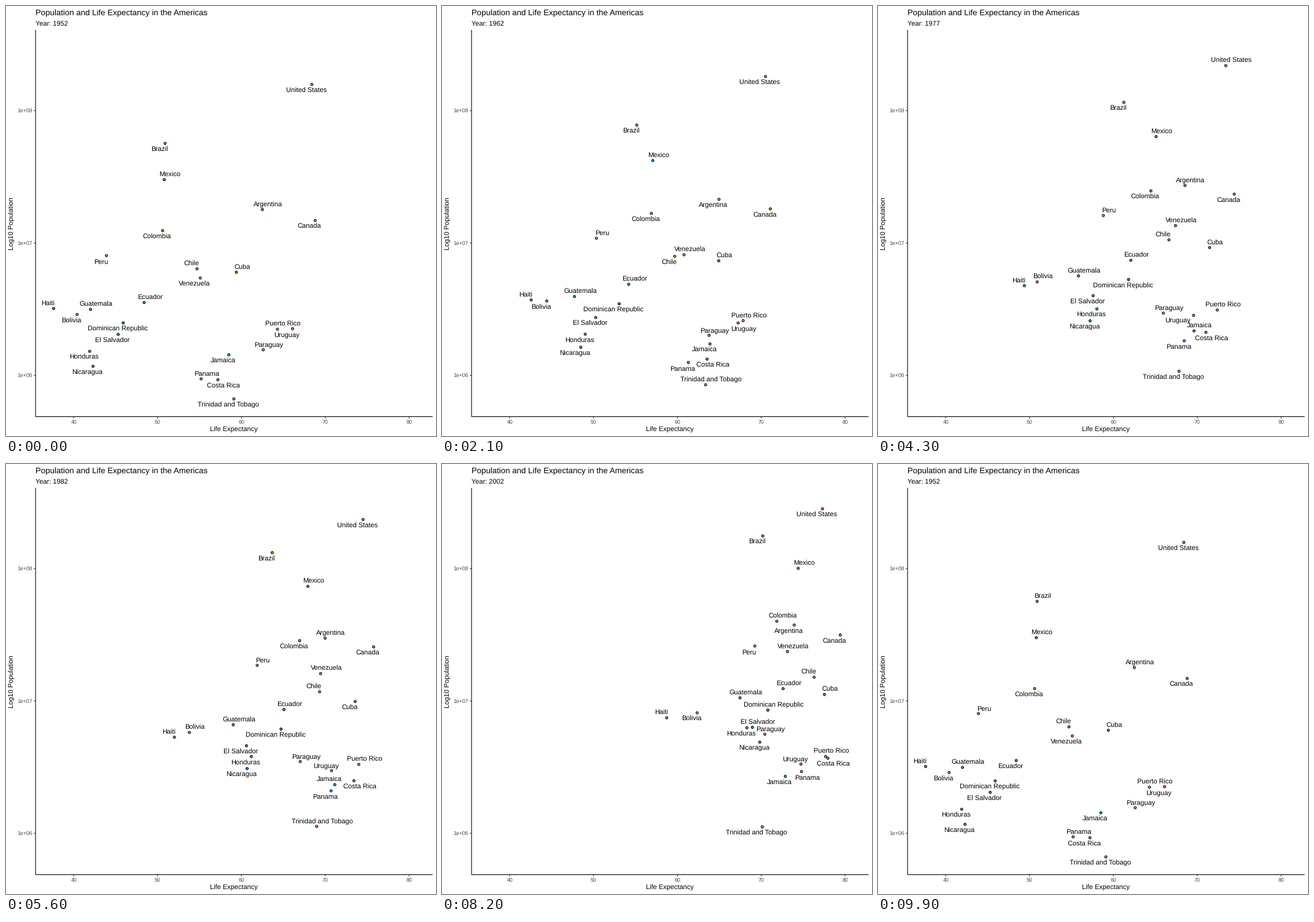
A matplotlib script for the animation above (10 s loop, 700 by 700 pixels).

```python
import random

import matplotlib.pyplot as plt
import numpy as np
from matplotlib.animation import FuncAnimation

plt.rcParams.update({"font.family": "Liberation Sans", "text.hinting": "none"})

SIZE = 700
LEFT, RIGHT, TOP, BOTTOM = 48.1, 694.5, 38.9, 668.5
STATES = 12
KEYS = [0, 6, 11]  # 1952, 1982 and 2007

# Life expectancy and population in millions at the keys, favoured label side
COUNTRIES = {
    "Argentina": ((62.5, 69.7, 75.3), (17.9, 29.3, 40.3), "NE"),
    "Bolivia": ((40.4, 53.2, 65.6), (2.88, 5.64, 9.12), "SW"),
    "Brazil": ((50.9, 63.2, 72.4), (56.6, 129, 190), "SW"),
    "Canada": ((68.8, 75.5, 80.7), (14.8, 25.2, 33.4), "SW"),
    "Chile": ((54.7, 68.8, 78.6), (6.38, 11.5, 16.3), "NW"),
    "Colombia": ((50.6, 66.5, 72.9), (12.4, 27.8, 44.2), "SW"),
    "Costa Rica": ((57.2, 73, 78.8), (.926, 2.42, 4.13), "SE"),
    "Cuba": ((59.4, 73.2, 78.3), (6.01, 9.79, 11.4), "NE"),
    "Dominican Republic": ((45.9, 64.2, 72.2), (2.49, 5.97, 9.32), "SW"),
    "Ecuador": ((48.4, 64.5, 75), (3.55, 8.37, 13.8), "NE"),
    "El Salvador": ((45.3, 60, 71.9), (2.04, 4.47, 6.94), "SW"),
    "Guatemala": ((42, 58.4, 70.3), (3.15, 6.4, 12.6), "NE"),
    "Haiti": ((37.6, 51.5, 60.9), (3.2, 5.2, 8.5), "NW"),
    "Honduras": ((41.9, 60.6, 70.2), (1.52, 3.67, 7.48), "SW"),
    "Jamaica": ((58.5, 70.9, 72.6), (1.43, 2.3, 2.78), "SW"),
    "Mexico": ((50.8, 67.4, 76.2), (30.1, 71.6, 109), "NE"),
    "Nicaragua": ((42.3, 60, 72.9), (1.17, 2.98, 5.68), "SW"),
    "Panama": ((55.2, 70.3, 75.5), (.94, 2.04, 3.24), "SW"),
    "Paraguay": ((62.6, 66.8, 71.8), (1.56, 3.37, 6.67), "NE"),
    "Peru": ((43.9, 61.3, 71.4), (8.03, 18.1, 28.7), "SW"),
    "Puerto Rico": ((64.3, 73.7, 78.7), (2.23, 3.28, 3.94), "NE"),
    "Trinidad and Tobago": ((59.1, 68.8, 69.8), (.663, 1.12, 1.06), "SW"),
    "United States": ((68.4, 74.3, 78.2), (158, 232, 301), "SW"),
    "Uruguay": ((66.1, 70.5, 76.4), (2.25, 2.95, 3.45), "NW"),
    "Venezuela": ((55.1, 69.1, 73.7), (5.44, 15.6, 26.1), "NE"),
}

# Timeline in state units: a hold, then a four-step linear move
timeline = []
for k in range(STATES):
    timeline += [k] * (5 if k < 4 else 4) + [k + q / 4 for q in (1, 2, 3, 4)]


def px(life):
    return 110.3 + (life - 40) * 13.645


def py(log_pop):
    return 601.2 - (log_pop - 6) * 215.4


def closed_path(values):
    """Parabola through the keys, sampled per state and closed to a loop."""
    path = np.polyval(np.polyfit(KEYS, values, 2), np.arange(STATES))
    return np.append(path, path[0])


def hue(h, c=100, l=65):
    """Polar LUV colour to sRGB."""
    u, v = c * np.cos(np.radians(h)), c * np.sin(np.radians(h))
    y = ((l + 16) / 116) ** 3
    u, v = u / (13 * l) + 0.1978398, v / (13 * l) + 0.4683363
    x = 9 * y * u / (4 * v)
    z = -x / 3 - 5 * y + 3 * y / v
    rgb = np.array([[3.240479, -1.53715, -0.498535],
                    [-0.969256, 1.875992, 0.041556],
                    [0.055648, -0.204043, 1.057311]]) @ [x, y, z]
    rgb = np.where(rgb > 0.00304, 1.055 * np.abs(rgb) ** (1 / 2.4) - 0.055, 12.92 * rgb)
    return tuple(np.clip(rgb, 0, 1))


fig = plt.figure(figsize=(SIZE / 72, SIZE / 72), dpi=72, facecolor="white")
ax = fig.add_axes([0, 0, 1, 1])
ax.set(xlim=(0, SIZE), ylim=(SIZE, 0))
ax.axis("off")


def write(x, y, s, size=11, **kw):
    return ax.text(x, y, s, fontsize=size, **{"va": "baseline", "color": "black", **kw})


def line(xs, ys, color="black"):
    ax.plot(xs, ys, color=color, lw=1.07, solid_capstyle="butt", snap=False)


write(48, 15, "Population and Life Expectancy in the Americas", 13.2)
subtitle = write(48, 32, "")
write(371.3, 693, "Life Expectancy", ha="center")
write(10.3, 354, "Log10 Population", rotation=90, ha="center", va="center")
for life in range(40, 90, 10):
    line([px(life)] * 2, [BOTTOM, BOTTOM + 2.8], "#333333")
    write(px(life), 680.3, str(life), 8.8, ha="center", color="#4d4d4d")
for p in (6, 7, 8):
    line([LEFT - 2.8, LEFT], [py(p)] * 2, "#333333")
    write(43.2, py(p) + 3, f"1e+0{p}", 8.8, ha="right", color="#4d4d4d")
line([LEFT, LEFT], [TOP, BOTTOM])
line([LEFT, RIGHT], [BOTTOM, BOTTOM])

count = len(COUNTRIES)
dots = ax.scatter([0] * count, [0] * count, s=3.9 ** 2, linewidths=0.95, edgecolors="black",
                  facecolors=[hue(15 + 360 * i / count) for i in range(count)], zorder=3)


class Country:
    def __init__(self, name, life, millions, side):
        self.xs = px(closed_path(life))
        self.ys = py(closed_path(np.log10(millions) + 6))
        self.side = side
        self.text = write(0, 0, name, ha="center", zorder=4)
        self.half = self.text.get_window_extent(fig.canvas.get_renderer()).width / 2

    def spot(self, t):
        steps = np.arange(STATES + 1)
        return np.interp(t, steps, self.xs), np.interp(t, steps, self.ys)


countries = [Country(name, *row) for name, row in COUNTRIES.items()]


def offset(side, half):
    """Centre of a label relative to its dot."""
    sx = 1 if "E" in side else -1
    sy = 1 if "S" in side else -1
    if len(side) == 3:  # beside the dot, such as ENE
        return sx * (half + 4.5), sy * 6.7
    return sx * 9.2, sy * 9


def clash(x, y, half, placed, spots):
    """How much a label at x, y runs into other labels, dots and the frame."""
    total = 60 * max(0, x + half - RIGHT) + 60 * max(0, LEFT - x + half)
    for a, b, h in placed:
        w, t = half + h - abs(x - a), 11 - abs(y - b)
        if w > 0 and t > 0:
            total += w * t
    for a, b in spots:
        if abs(x - a) < half + 2 and abs(y - b) < 6.5:
            total += 30
    return total


def layout(i, spots):
    """Repelled label centres: favoured side first, now and then swapped."""
    rng = random.Random(i)
    placed = []
    for c, (x, y) in zip(countries, spots):
        sides = [c.side, "NE", "SW", "NW", "SE", "ENE", "WSW", "ESE", "WNW"]
        if rng.random() < 0.3:
            sides = rng.sample(["NE", "SW"], 2) + sides
        ways = [(x + dx, y + dy) for dx, dy in (offset(s, c.half) for s in sides)]
        best = min(ways, key=lambda w: clash(*w, c.half, placed, spots))
        placed.append((*best, c.half))
    return placed


def draw(i):
    t = timeline[i]
    year = 1952 + 5 * (int(np.ceil(t - 0.5)) % STATES)
    subtitle.set_text(f"Year: {year}")
    spots = [c.spot(t) for c in countries]
    dots.set_offsets(spots)
    for c, (x, y, _) in zip(countries, layout(i, spots)):
        c.text.set_position((x, y + 4.2))
    return [dots, subtitle] + [c.text for c in countries]


anim = FuncAnimation(fig, draw, frames=len(timeline), interval=100, repeat=True, repeat_delay=0)
plt.show()
```
